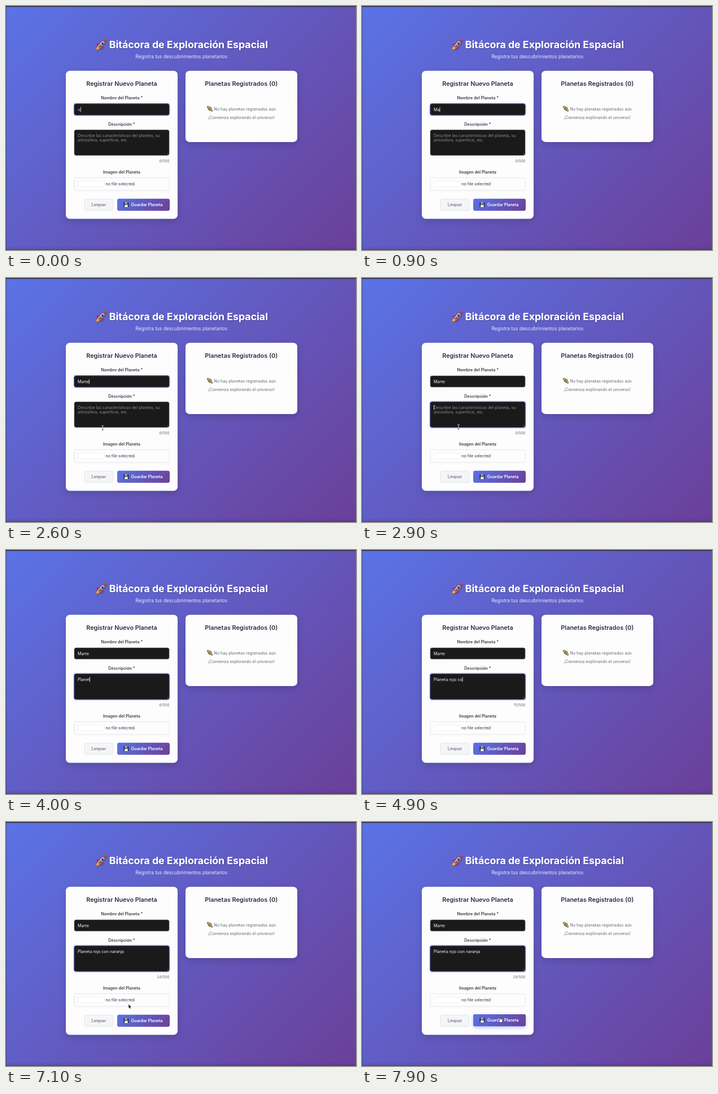
These frames come from a looping animation (620 by 434 pixels, 8000 ms). An HTML page:

```html
<!DOCTYPE html>
<html lang="es">
<head>
<meta charset="utf-8">
<title>Bitácora</title>
<style>
  html, body { margin: 0; width: 100%; height: 100%; overflow: hidden; background: #5a72e4; }
  svg { display: block; width: 100vw; height: 100vh; }
  text { font-family: Inter, "Open Sans", sans-serif; font-size: 7.2px; white-space: pre; }
  .mid { text-anchor: middle; }
  .end { text-anchor: end; }
  .semi { font-weight: 600; }
  .h2 { font-size: 10.8px; font-weight: 600; fill: #262e40; }
  .label { font-weight: 600; fill: #333b4a; }
  .muted { fill: #5f6674; }
  .typed { fill: #fafafa; }
  .ph { fill: #8c8c8c; }
  .card { fill: #fdfdfe; filter: url(#cardShadow); }
  .field { fill: #1a1a1a; stroke: #d4d7de; stroke-width: .6; }
  .ring { fill: none; stroke: #667eea; stroke-width: 2; stroke-opacity: .2; }
</style>
</head>
<body>
<svg viewBox="0 0 620 434" preserveAspectRatio="none">
  <defs>
    <linearGradient id="sky" gradientUnits="userSpaceOnUse" x1="46.5" y1="-46.5" x2="573.5" y2="480.5">
      <stop offset="0" stop-color="#5a73e6"/><stop offset="1" stop-color="#6b3f98"/>
    </linearGradient>
    <linearGradient id="save" gradientUnits="userSpaceOnUse" x1="215" y1="325" x2="272" y2="382">
      <stop offset="0" stop-color="#5a73e6"/><stop offset="1" stop-color="#6b3f98"/>
    </linearGradient>
    <linearGradient id="floor" x2="0" y2="1">
      <stop offset="0" stop-color="#20203a" stop-opacity="0"/><stop offset="1" stop-color="#20203a" stop-opacity=".16"/>
    </linearGradient>
    <filter id="cardShadow" x="-20%" y="-20%" width="140%" height="150%">
      <feDropShadow dx="0" dy="4.5" stdDeviation="6.5" flood-color="#000" flood-opacity=".15"/>
    </filter>
    <filter id="textShadow" x="-5%" y="-30%" width="110%" height="180%">
      <feDropShadow dx=".9" dy=".9" stdDeviation="1" flood-color="#000" flood-opacity=".3"/>
    </filter>
    <filter id="lift" x="-20%" y="-50%" width="140%" height="220%">
      <feDropShadow dx="0" dy="2.2" stdDeviation="3" flood-color="#667eea" flood-opacity=".45"/>
    </filter>
  </defs>

  <rect width="620" height="434" fill="url(#sky)"/>
  <rect y="427" width="620" height="7" fill="url(#floor)"/>
  <rect width="620" height="1.4" fill="#29292e"/>
  <rect width="1" height="434" fill="#29292e" opacity=".45"/>
  <rect y="433" width="620" height="1" fill="#29292e" opacity=".4"/>

  <!-- header -->
  <g filter="url(#textShadow)">
    <g transform="translate(168.8 68.8) rotate(45)">
      <path d="M-2-2Q-6.6 1-5.8 7.4L-2 4Z M2-2Q6.6 1 5.8 7.4L2 4Z" fill="#b9302f"/>
      <path d="M-1.8 5Q-3.6 9 0 13.4Q3.6 9 1.8 5Z" fill="#f08a24"/>
      <path d="M-.9 5Q-1.8 8 0 10.4Q1.8 8 .9 5Z" fill="#ffe27a"/>
      <path d="M0-13Q-4-7-2.8 5.4H2.8Q4-7 0-13Z" fill="#b4b9c0"/>
      <path d="M0-13Q1.6-6 .9 5.4H2.8Q4-7 0-13Z" fill="#6d737c"/>
      <path d="M0-13Q-2.4-10.4-3-7H3Q2.4-10.4 0-13Z" fill="#c8373a"/>
      <circle cy="-3" r="1.7" fill="#2c3440"/>
      <path d="M-.7 .6H.7V7H-.7Z" fill="#a3262c"/>
    </g>
    <text x="323.4" y="75.3" class="mid" fill="#fff" style="font-size:17.73px;font-weight:700">Bitácora de Exploración Espacial</text>
  </g>
  <text x="310.8" y="93.4" class="mid" fill="#e9ebfb" style="font-size:8.47px">Registra tus descubrimientos planetarios</text>

  <!-- form -->
  <rect class="card" x="106" y="115.3" width="198" height="263.2" rx="7"/>
  <text x="205" y="142.2" class="mid h2">Registrar Nuevo Planeta</text>
  <text x="205.3" y="166.4" class="mid label">Nombre del Planeta *</text>
  <rect class="ring" id="nameRing" x="119.8" y="172.8" width="170.4" height="22.4" rx="4"/>
  <rect class="field" id="nameBox" x="120.7" y="173.7" width="168.6" height="20.6" rx="3.4"/>
  <text id="name" x="127" y="186.7" class="typed"></text>

  <text x="205" y="212.6" class="mid label">Descripción *</text>
  <rect class="ring" id="descRing" x="119.8" y="219.1" width="170.4" height="47.8" rx="4"/>
  <rect class="field" id="descBox" x="120.7" y="220" width="168.6" height="46" rx="3.4"/>
  <path d="M284.5 264.5L288 261M286.6 264.5L288 263.1" stroke="#8a8a8a" stroke-width=".5"/>
  <g id="hint">
    <text x="127" y="232.6" class="ph">Describe las características del planeta, su</text>
    <text x="127" y="241.3" class="ph">atmósfera, superficie, etc.</text>
  </g>
  <text x="127" y="232.6" class="typed"><tspan id="desc"></tspan><tspan id="marked" fill="#b7bbee"></tspan></text>
  <rect id="caret" width=".8" height="8.6" fill="#fff"/>
  <text id="count" x="289.6" y="277.7" class="end muted" style="font-size:6.4px"></text>

  <g id="popup">
    <rect x="180.8" y="235.4" width="28" height="9.8" rx="2" fill="#222" stroke="#4a4a4a" stroke-width=".5"/>
    <path d="M198.8 235.6V245" stroke="#4a4a4a" stroke-width=".5"/>
    <text x="189.6" y="242.4" class="mid semi" fill="#fff" style="font-size:5.6px">Nara</text>
    <path d="M202.7 239L205.3 241.6M205.3 239L202.7 241.6" stroke="#aaa" stroke-width=".6"/>
  </g>

  <text x="205" y="297.8" class="mid label">Imagen del Planeta</text>
  <rect x="120.7" y="305.3" width="168.6" height="22.8" rx="3.4" fill="#fdfdfe" stroke="#dfe2e8" stroke-width=".9"/>
  <rect x="126.8" y="311.6" width="47.6" height="9.6" rx="2.4" fill="#fff" stroke="#e2e2e4" stroke-width=".6"/>
  <text x="176.2" y="319.1" fill="#2f3744">no file selected</text>

  <rect x="139.3" y="343.3" width="50.4" height="20.6" rx="3.4" fill="#f4f5f7" stroke="#d8dbe0" stroke-width=".7"/>
  <text x="164.5" y="356.2" class="mid muted" style="font-weight:500">Limpiar</text>
  <g id="button">
    <rect id="glow" x="197" y="342.8" width="93" height="21.4" rx="3.4" fill="#667eea" filter="url(#lift)"/>
    <rect x="197" y="342.8" width="93" height="21.4" rx="3.4" fill="url(#save)"/>
    <g transform="translate(208.6 349.1)">
      <path d="M.6 0H7.6L8.6 1V8Q8.6 8.6 8 8.6H.6Q0 8.6 0 8V.6Q0 0 .6 0Z" fill="#20262e"/>
      <path d="M2 0H6.8V3H2Z" fill="#c3c9d0"/>
      <path d="M5.1 .5H6.1V2.5H5.1Z" fill="#20262e"/>
      <path d="M1.4 4.3H7.2V8.6H1.4Z" fill="#f2f4f6"/>
      <path d="M1.4 4.3H7.2V5.2H1.4Z" fill="#6f9fd0"/>
    </g>
    <text x="249.8" y="356.2" class="mid semi" fill="#fff">Guardar Planeta</text>
  </g>

  <!-- list -->
  <rect class="card" x="318" y="115.3" width="198" height="126.6" rx="7"/>
  <text x="416.8" y="142.2" class="mid h2" style="font-size:10.9px">Planetas Registrados (0)</text>
  <g transform="translate(361.2 182.6) rotate(45)">
    <ellipse rx="6" ry="1.9" fill="none" stroke="#4d4736" stroke-width=".9"/>
    <circle r="3.7" fill="#b59a58"/>
    <path d="M-3.4-1.2Q0 .2 3.4-1.2" fill="none" stroke="#857142" stroke-width=".8"/>
    <path d="M-6 0A6 1.9 0 0 0 6 0" fill="none" stroke="#4d4736" stroke-width=".9"/>
  </g>
  <text x="423.1" y="185.6" class="mid muted">No hay planetas registrados aún</text>
  <text x="416.8" y="201.4" class="mid muted">¡Comienza explorando el universo!</text>

  <!-- pointers, hot spot at 0,0 -->
  <path id="arrow" d="M0 0V7.4L1.7 5.9L2.9 8.6L4.2 8L3.1 5.4H5.4Z" fill="#000" stroke="#fff" stroke-width=".6"/>
  <g id="beam" fill="none">
    <path d="M-1.8-4Q0-4 0-3V3Q0 4-1.8 4M1.8-4Q0-4 0-3M0 3Q0 4 1.8 4" stroke="#ddd" stroke-width="1.4"/>
    <path d="M-1.8-4Q0-4 0-3V3Q0 4-1.8 4M1.8-4Q0-4 0-3M0 3Q0 4 1.8 4" stroke="#333" stroke-width=".6"/>
  </g>
  <path id="hand" d="M-1.2-3.6Q-.4-4.4 .2-3.5L.6-1.4Q1.6-1.8 2-1.1Q3-1.3 3.2-.5Q4.1-.5 4 .5L3.6 3Q3.2 4.6 1.4 4.6H.2Q-1 4.6-1.8 3L-3 1Q-2.8 .2-1.8 .7L-.8 1.2Z" fill="#fff" stroke="#222" stroke-width=".6"/>
</svg>
<script>
const LOOP = 8000;
const el = Object.fromEntries([...document.querySelectorAll('[id]')].map(n => [n.id, n]));

const NAME = 'Marte', NAME_AT = [500, 900, 1200, 1500, 1700];
const DESC = 'Planeta rojo con naranja';
const DESC_AT = [3300, 3500, 3600, 3700, 3800, 4000, 4100, 4200, 4400, 4500, 4600, 4700,
  4750, 4800, 4900, 5100, 5300, 5400, 5500, 5600, 5900, 6100, 6200, 6400];
const FOCUS_AT = 2800;
// pointer path: time, x, y
const PATHS = [
  [[1900, 170.5, 285], [2200, 173, 280], [2700, 171, 265], [3300, 171, 265]],
  [[7100, 217, 324], [7400, 232, 404], [7800, 245, 352], [LOOP, 245, 352]]
];

const show = (node, on) => node.setAttribute('visibility', on ? 'visible' : 'hidden');
const clamp = v => Math.min(1, Math.max(0, v));
const ease = v => v * v * (3 - 2 * v);
const typed = (text, times, t) => text.slice(0, times.filter(at => at <= t).length);

function pointer(t) {
  const path = PATHS.find(p => t >= p[0][0] && t < p[p.length - 1][0]);
  if (!path) return null;
  const i = path.findIndex(p => p[0] > t);
  const [a, b] = [path[i - 1], path[i]];
  const k = ease((t - a[0]) / (b[0] - a[0]));
  return { x: a[1] + (b[1] - a[1]) * k, y: a[2] + (b[2] - a[2]) * k };
}

function focusRing(box, ring, on) {
  box.style.stroke = on ? '#4f63d2' : '';
  box.style.strokeWidth = on ? '.9' : '';
  show(ring, on);
}

function caretOn(t) {
  return !(t >= 6900 && t < 7400) && t < 7850;
}

function render(t) {
  const inDesc = t >= FOCUS_AT;
  el.name.textContent = t < 200 ? '<' : typed(NAME, NAME_AT, t);
  const text = typed(DESC, DESC_AT, t);
  const suggest = t >= 5900 && t < 6200;
  const cut = suggest ? DESC.indexOf('nara') : text.length;
  el.desc.textContent = text.slice(0, cut);
  el.marked.textContent = text.slice(cut);
  el.count.textContent = text.length + '/500';
  show(el.hint, !text);
  show(el.popup, suggest);
  focusRing(el.nameBox, el.nameRing, !inDesc);
  focusRing(el.descBox, el.descRing, inDesc);

  const line = inDesc ? el.desc.parentNode : el.name;
  const width = line.textContent ? line.getComputedTextLength() : 0;
  el.caret.setAttribute('x', 127 + width);
  el.caret.setAttribute('y', inDesc ? 225.8 : 179.8);
  show(el.caret, caretOn(t));

  const p = pointer(t);
  const overText = p && p.y > 220 && p.y < 267;
  const overSave = p && t > 7500 && p.y > 342 && p.y < 364;
  for (const [node, on] of [[el.arrow, p && !overText && !overSave], [el.beam, overText], [el.hand, overSave]]) {
    show(node, on);
    if (p) node.setAttribute('transform', `translate(${p.x} ${p.y})`);
  }

  const hover = ease(clamp((t - 7600) / 250));
  el.button.setAttribute('transform', `translate(0 ${-0.9 * hover})`);
  el.glow.setAttribute('opacity', hover);
}

const start = performance.now();
function tick() {
  render((performance.now() - start) % LOOP);
  requestAnimationFrame(tick);
}
render(0);
requestAnimationFrame(tick);
</script>
</body>
</html>
```
